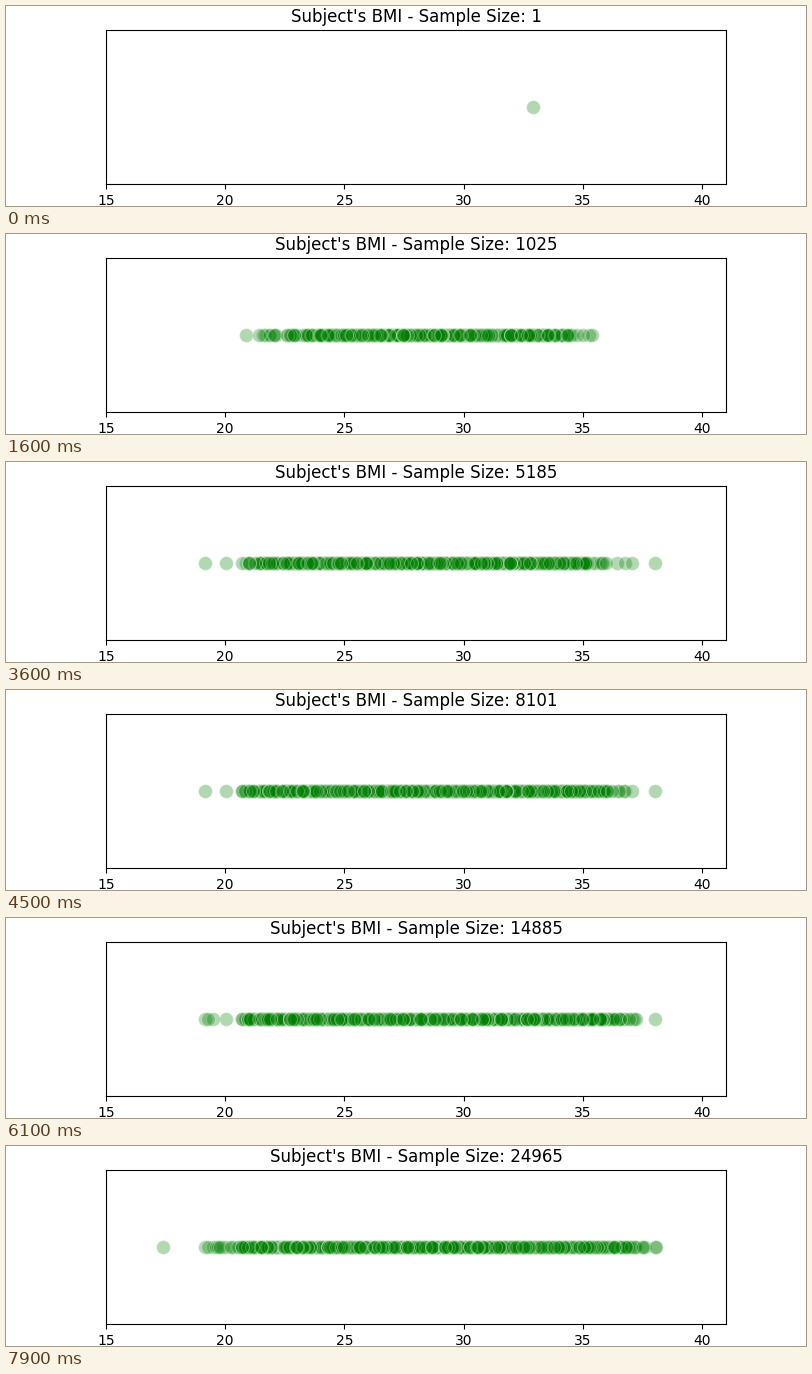
Recreate the animation shown at these times as a matplotlib script. Size 800 px wide and 200 px high, loop 8 s.

```python
import numpy as np
import matplotlib.pyplot as plt
from matplotlib.animation import FuncAnimation

FRAMES = 80
INTERVAL = 100


def sample_size(frame):
    return 4 * frame ** 2 + 1


np.random.seed(0)
bmi = np.random.normal(28.5, 2.5, sample_size(FRAMES - 1))
points = np.column_stack([bmi, np.zeros_like(bmi)])

fig, ax = plt.subplots(figsize=(8, 2), dpi=100)
ax.set_xlim(15, 41)
ax.set_ylim(-1, 1)
ax.set_yticks([])
dots = ax.scatter([0], [0], s=100, color="green", alpha=0.3,
                  edgecolors="white", linewidths=0.8)


def update(frame):
    n = sample_size(frame)
    dots.set_offsets(points[:n])
    title = ax.set_title(f"Subject's BMI - Sample Size: {n}")
    return dots, title


def init():
    return update(0)


anim = FuncAnimation(fig, update, frames=FRAMES, init_func=init,
                     interval=INTERVAL, repeat=True, repeat_delay=0)
plt.show()
```
